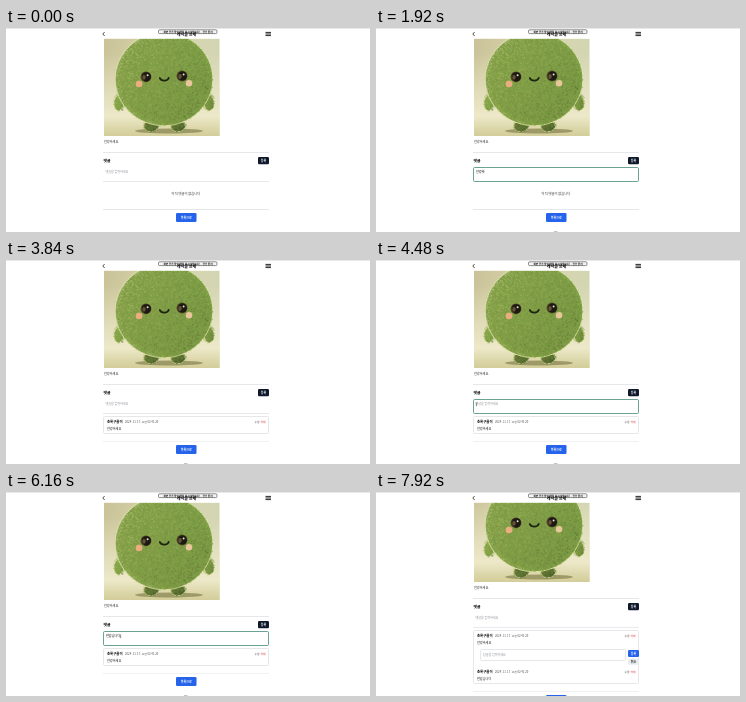
Recreate the animation shown at these times as an HTML page with a canvas. Size 364x204 px, loop 8000 ms.

```html
<!DOCTYPE html>
<html lang="ko">
<head>
<meta charset="utf-8">
<style>
html, body { margin: 0; width: 100%; height: 100%; overflow: hidden; background: #fff; }
canvas { display: block; width: 364px; height: 204px; }
</style>
</head>
<body>
<canvas id="stage"></canvas>
<script>
const W = 364, H = 204, LOOP = 8000;
const FOCUS = [560, 4400], BLUR = [3200, 6400], POST = [3440, 6560], REPLY = 7600;
const dpr = window.devicePixelRatio || 1;
const FONT = '"Noto Sans CJK KR", "Noto Sans CJK", "Noto Sans", sans-serif';
const g = setup(document.getElementById('stage'));
const photo = document.createElement('canvas');
drawPhoto(setup(photo));

const FIRST = ['ㅇ', '아', '안', '안ㄴ', '안녀', '안녕', '안녕ㅎ', '안녕하', '안녕핫', '안녕하세', '안녕하셍', '안녕하세요'];
const SECOND = ['ㅂ', '바', '반', '반ㄱ', '반가', '반갑', '반갑ㅅ', '반갑스', '반갑습', '반갑습ㄴ', '반갑습니', '반갑습닏', '반갑습니다'];

function setup(canvas) {
  canvas.width = W * dpr;
  canvas.height = H * dpr;
  const c = canvas.getContext('2d');
  c.scale(dpr, dpr);
  return c;
}

function oval(c, x, y, rx, ry, fill, turn = 0) {
  c.fillStyle = fill;
  c.beginPath();
  c.ellipse(x, y, rx, ry, turn, 0, 7);
  c.fill();
}

function linear(c, x0, y0, x1, y1, ...colors) {
  const grad = c.createLinearGradient(x0, y0, x1, y1);
  colors.forEach((color, i) => grad.addColorStop(i / (colors.length - 1), color));
  return grad;
}

function drawPhoto(c) {
  let seed = 7;
  const rnd = () => (seed = seed * 16807 % 2147483647) / 2147483647;
  c.beginPath();
  c.rect(98, 0, 115.5, 108);
  c.clip();
  c.fillStyle = linear(c, 98, 0, 213, 30, '#c9c196', '#d8d5b0', '#d3d5b2');
  c.fillRect(98, 0, 116, 108);
  c.fillStyle = linear(c, 0, 25, 0, 92, 'rgba(238,234,203,0)', '#eeeacb');
  c.fillRect(98, 0, 116, 108);
  c.fillStyle = linear(c, 0, 88, 0, 108, 'rgba(205,200,142,0)', '#d3cd9a');
  c.fillRect(98, 88, 116, 20);
  oval(c, 163, 103, 34, 2.4, 'rgba(100,98,45,.5)');

  // Lit from the left, with a pale rim and a darker lower right
  const fur = (x, y, rx, ry, count, lift = 0, turn = 0) => {
    oval(c, x, y, rx, ry, '#e4e4aa', turn);
    oval(c, x, y, rx - .7, ry - .7, `hsl(80,38%,${44 + lift}%)`, turn);
    c.lineWidth = .65;
    for (let i = 0; i < count; i++) {
      const a = rnd() * 6.283, r = Math.sqrt(rnd());
      const u = Math.cos(a) * r, v = Math.sin(a) * r;
      const px = x + u * rx * .98, py = y + v * ry * .98;
      const b = a + (rnd() - .5) * 1.6;
      const rim = Math.max(0, r - .9) * (u < 0 ? 190 : 90);
      const light = 46 + lift - 7 * u - 6 * v + rim + (rnd() - .5) * 20;
      c.strokeStyle = `hsla(${74 + u * 6 + rnd() * 10},40%,${light}%,.65)`;
      c.beginPath();
      c.moveTo(px, py);
      c.lineTo(px + Math.cos(b) * 1.5, py + Math.sin(b) * 1.5);
      c.stroke();
    }
  };
  fur(145, 98, 7.5, 6, 140, -12);
  fur(172, 98, 7.5, 6, 140, -12);
  fur(113.5, 74, 5.6, 9, 140, 2, .25);
  fur(202.5, 74, 5.6, 9, 140, -2, -.25);
  fur(158, 51, 49, 47, 4200);

  for (const [x, y] of [[140, 48.8], [176, 48]]) {
    oval(c, x, y, 5.4, 5.4, '#4a3f26');
    oval(c, x + .4, y, 4.5, 4.6, '#1c1812');
    oval(c, x - 2, y + .5, 1.7, 2.4, '#65533a');
    oval(c, x + 1.6, y - 1.6, 1, 1, '#e4dfd0');
  }
  oval(c, 133, 56, 3.4, 3.3, '#e9ad80');
  oval(c, 183, 55.3, 3.3, 3.2, '#e8c79b');
  c.strokeStyle = '#1d2412';
  c.lineWidth = 1.8;
  c.lineCap = 'round';
  c.beginPath();
  c.moveTo(153.8, 50);
  c.bezierCurveTo(155.2, 53.6, 161.6, 53.6, 162.8, 49.8);
  c.stroke();
}

function text(s, x, y, size, color, bold = false, align = 'left') {
  g.font = `${bold ? 700 : 400} ${size}px ${FONT}`;
  g.textAlign = align;
  g.textBaseline = 'middle';
  g.fillStyle = color;
  g.fillText(s, x, y);
  return g.measureText(s).width;
}

function line(color, width, ...p) {
  g.strokeStyle = color;
  g.lineWidth = width;
  g.beginPath();
  for (let i = 0; i < p.length; i += 2) g.lineTo(p[i], p[i + 1]);
  g.stroke();
}

function box(x, y, w, h, fill, stroke, lw = 1) {
  g.beginPath();
  g.roundRect(x, y, w, h, 1.2);
  if (fill) { g.fillStyle = fill; g.fill(); }
  if (stroke) { g.strokeStyle = stroke; g.lineWidth = lw; g.stroke(); }
}

function button(s, x, y, w, h, fill, color = '#fff') {
  box(x, y, w, h, fill);
  text(s, x + w / 2, y + h / 2, 3, color, true, 'center');
}

const ease = (t, a, b) => {
  const k = Math.min(1, Math.max(0, (t - a) / (b - a)));
  return k * k * (3 - 2 * k);
};
const typed = (list, t, start) =>
  t < start ? '' : list[Math.min(list.length - 1, Math.floor((t - start) / 120))];

function comment(body, y) {
  text('초록구름이', 101, y, 3.4, '#000', true);
  text('2024. 11. 17. 오전 02:41:20', 119, y, 2.8, '#444');
  text('수정', 251, y, 2.7, '#333', false, 'center');
  text('삭제', 257, y, 2.7, '#e0202c', false, 'center');
  text(body, 101, y + 6.6, 3.1, '#111');
}

function input(t) {
  const focused = FOCUS.some((start, i) => t >= start && t < BLUR[i]);
  const value = t < POST[0] ? typed(FIRST, t, 960) : t < POST[1] ? typed(SECOND, t, 4640) : '';
  if (focused) box(97.5, 139.5, 165, 14, '#fff', '#468b78', .8);
  else line('#e9eaec', 1, 97, 153.5, 263, 153.5);
  let w = 0;
  if (value) w = text(value, 100, 144.3, 3.1, '#000');
  else text('댓글을 입력하세요', 99.5, 144.3, 3, '#8d9096');
  if (focused && t % 1000 < 560) line('#222', .5, 100.4 + w, 142.4, 100.4 + w, 146.2);
}

function header() {
  g.fillStyle = '#fff';
  g.fillRect(0, 0, W, 10.8);
  line('#e9e9e9', 1, 0, .5, W, .5);
  line('#222', .8, 98.6, 4, 96.8, 6, 98.6, 8);
  for (const y of [4.4, 6, 7.6]) line('#111', .9, 259.5, y, 265, y);
  box(152.5, 1.8, 58.5, 3.8, '#f4f4f4', '#444', .6);
  text('화면 공유 중인 탭을 보고 있습니다 · 공유 중지', 182, 3.7, 2.6, '#111', true, 'center');
  text('게시글 상세', 180.5, 6.2, 4, '#000', true, 'center');
}

function draw(t) {
  const count = POST.filter(start => t >= start).length;
  const reply = t >= REPLY ? 18 : 0;
  const extra = (count > 1 ? 18 : 0) + reply;
  const scroll = 18 * ease(t, 6890, 7240);

  g.fillStyle = '#fff';
  g.fillRect(0, 0, W, H);
  g.save();
  g.translate(0, -scroll);
  g.drawImage(photo, 0, 0, W, H);
  text('안녕하세요.', 98, 114.3, 3.1, '#222');
  line('#e6e7ea', 1, 97, 124.5, 263, 124.5);
  text('댓글', 97.5, 132.5, 3.9, '#000', true);
  button('등록', 252, 129, 11, 7.2, '#0f172a');
  input(t);

  if (count) {
    box(97.5, 156.5, 165, 17 + extra, '#fff', '#e6e7ea');
    comment('안녕하세요', 161.8);
    if (count > 1) comment('반갑습니다', 179.8 + reply);
  } else {
    text('아직 댓글이 없습니다', 180, 165.3, 3.3, '#333', false, 'center');
  }
  line(count ? '#f0f1f3' : '#e6e7ea', 1, 97, 181.5 + extra, 263, 181.5 + extra);
  if (reply) {
    box(104.5, 175.5, 145, 11, '#fff', '#e6e7ea');
    text('답글을 입력하세요', 107, 181, 3, '#8d9096');
    button('등록', 252, 176, 11, 7, '#2563eb');
    button('취소', 252, 184.8, 11, 6, '#e8ebef', '#333');
  }
  button('목록으로', 170, 185 + extra, 20.5, 9, '#2563eb');
  if (t >= 80) line('#999', .6, 178, 203.5 + extra, 181.5, 203.5 + extra);
  g.restore();
  header();
}

function frame() {
  draw(performance.now() % LOOP);
  requestAnimationFrame(frame);
}
frame();
</script>
</body>
</html>
```
